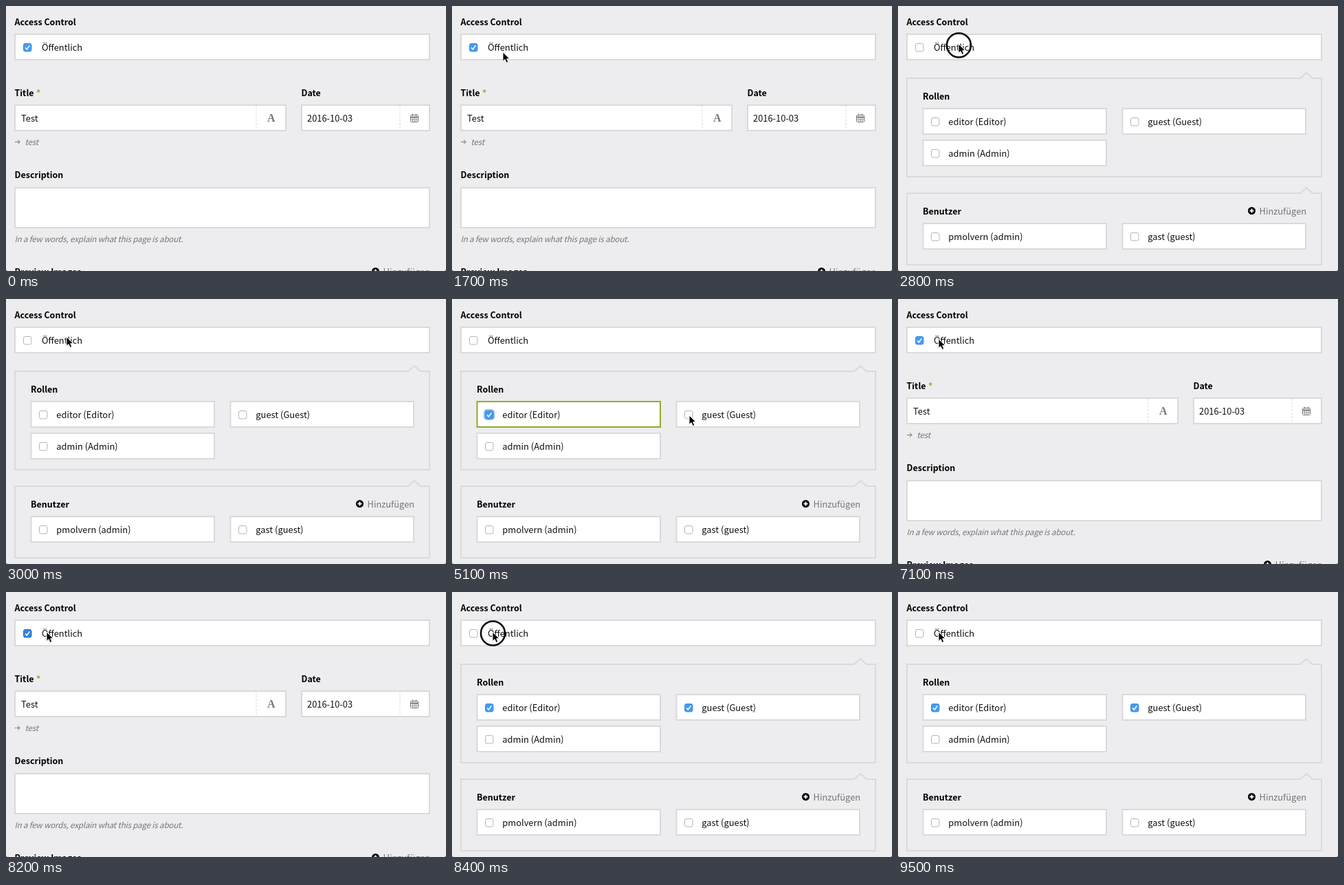
An HTML page that plays this animation: 640x385 px, repeating every 9.6 s.

```html
<!DOCTYPE html>
<html lang="de">
<head>
<meta charset="utf-8">
<title>Access Control</title>
<style>
  html, body { margin: 0; width: 100%; height: 100%; overflow: hidden; background: #edecee; }
  svg { display: block; width: 640px; height: 385px; }
  text { font: 12.9px "Noto Sans CJK JP", "Noto Sans CJK SC", "Noto Sans CJK", sans-serif; fill: #111; white-space: pre; }
  .label { font-size: 12.5px; font-weight: 600; fill: #000; }
  .help { font-size: 11.6px; font-style: italic; letter-spacing: -.17px; fill: #777; }
  .muted { fill: #777; }
  .star { fill: #8dae28; }
  .serif { font: bold 16px "Liberation Serif", serif; fill: #777; }
  .field { fill: #fff; stroke: #dad9dc; stroke-width: 2; }
  .field.focus { stroke: #8dae28; }
  .panel { fill: none; stroke: #dad9dc; stroke-width: 2; }
  .dash { stroke: #dad9dc; stroke-dasharray: 3 2; }
  .icon { fill: none; stroke: #777; }
  .box { fill: #fff; stroke: #b4b4b6; }
  .pressed .box { fill: #dcdcde; stroke: #8f8f92; }
  .checked .box { fill: #459bf4; stroke: #3c8fe8; }
  .checked.pressed .box { fill: #3483e0; stroke: #2a70c8; }
  .tick { fill: none; stroke: #fff; stroke-width: 1.6; visibility: hidden; }
  .checked .tick { visibility: visible; }
  .glow { fill: none; stroke: #8fc0f2; stroke-width: 3; visibility: hidden; }
  .focus .glow { visibility: visible; }
</style>
</head>
<body>
<svg id="stage" viewBox="0 0 640 385"></svg>
<script>
const LOOP = 9600;
const stage = document.getElementById('stage');

const text = (x, y, value, style = '') => `<text x="${x}" y="${y}" class="${style}">${value}</text>`;
const field = (x, y, w, h) => `<rect class="field" x="${x}" y="${y}" width="${w}" height="${h}"/>`;
const panel = (top, bottom) =>
  `<path class="panel" d="M13 ${top}H585L594 ${top - 8}L603 ${top}H616V${bottom}H13Z"/>`;
const dash = x => `<path class="dash" d="M${x} 145V181"/>`;

const option = (id, x, y, w, label, inset = 12) => `
  <g id="${id}">
    ${field(x, y, w, 37)}
    <g transform="translate(${x + inset} ${y + 13})">
      <rect class="glow" x="-.5" y="-.5" width="13" height="13" rx="3.5"/>
      <rect class="box" x=".5" y=".5" width="11.5" height="11.5" rx="2.5"/>
      <path class="tick" d="M3 6.5L5.3 9L9.4 3.4"/>
    </g>
    ${text(x + inset + (inset > 11.9 && w > 300 ? 27 : 25.3), y + 24, label)}
  </g>`;

const addButton = (x, y) => `
  <circle cx="${x}" cy="${y}" r="5.5"/>
  <path d="M${x - 3} ${y}h6M${x} ${y - 3}v6" stroke="#fff" stroke-width="1.8"/>
  ${text(x + 11, y + 5, 'Hinzufügen', 'muted')}`;

const calendar = `
  <g class="icon">
    <rect x="588.5" y="158.5" width="11" height="10" rx="1"/>
    <path d="M588 161.5H600" stroke-width="2"/>
    <path d="M591.5 156.5v3M596.5 156.5v3"/>
    <path d="M591.5 162v6M594 162v6M596.5 162v6M589 165.2h10" stroke-width=".7"/>
  </g>`;

stage.innerHTML = `
  ${text(12.5, 27.5, 'Access Control', 'label')}
  ${option('everyone', 13, 41, 603, 'Öffentlich')}
  <g id="publicView">
    ${text(12.5, 130.5, 'Title', 'label')}${text(44, 130.5, '*', 'label star')}
    ${text(429.5, 130.5, 'Date', 'label')}
    ${field(13, 144, 394, 37)}${dash(364)}${text(22, 168, 'Test')}
    ${text(380, 168, 'A', 'serif')}
    ${field(430, 144, 186, 37)}${dash(573)}${text(438, 168, '2016-10-03')}
    ${calendar}
    <path class="icon" d="M13 197.5H20M17 194.5L20.3 197.5L17 200.5"/>
    ${text(27.5, 202, 'test', 'help')}
    ${text(12.5, 250, 'Description', 'label')}
    ${field(13, 264, 603, 58)}
    ${text(12.5, 342.5, 'In a few words, explain what this page is about.', 'help')}
    ${text(12.5, 390.5, 'Preview Images', 'label')}
    ${addButton(537.5, 385.5)}
  </g>
  <g id="roleView">
    ${panel(105, 248)}
    ${text(36, 135.5, 'Rollen', 'label')}
    ${option('editor', 36.5, 149, 266.5, 'editor (Editor)', 11.5)}
    ${option('guest', 326.5, 149, 266.5, 'guest (Guest)', 11.5)}
    ${option('admin', 36.5, 195, 266.5, 'admin (Admin)', 11.5)}
    ${panel(272, 376)}
    ${text(36, 302.5, 'Benutzer', 'label')}
    ${addButton(514.5, 297.5)}
    ${option('firstUser', 36.5, 316, 266.5, 'pmolvern (admin)', 11.5)}
    ${option('secondUser', 326.5, 316, 266.5, 'gast (guest)', 11.5)}
  </g>
  <path d="M0 382q0 3 3 3H0ZM640 382q0 3-3 3H640Z" fill="#666"/>
  <g id="cursor">
    <circle id="ring" cx=".5" cy="2" r="17.5" fill="none" stroke="#0b0b12" stroke-width="2.6"/>
    <path d="M0 0V13.5L3.1 10.6L5.2 15.5L7.8 14.4L5.7 9.7H10Z" fill="#000" stroke="#fff" stroke-width="1"/>
  </g>`;

// Pointer keyframes: time, x, y
const path = [
  [1200, 215, 392], [1700, 74, 67], [2100, 88, 55], [3900, 88, 55],
  [4400, 55, 167], [4750, 55, 167], [5100, 345, 169], [5900, 345, 169],
  [6500, 59, 58], [LOOP, 59, 58]
];

const HOLD = 200;
const clicks = [
  { id: 'everyone', at: 2600 }, { id: 'editor', at: 4500 }, { id: 'guest', at: 5300 },
  { id: 'everyone', at: 6800 }, { id: 'everyone', at: 8200 }
];

const byId = id => document.getElementById(id);
const show = (id, visible) => { byId(id).style.display = visible ? '' : 'none'; };

function pointerAt(t) {
  const next = path.findIndex(key => key[0] > t);
  const [t0, x0, y0] = path[next - 1], [t1, x1, y1] = path[next];
  const p = (t - t0) / (t1 - t0), eased = p * p * (3 - 2 * p);
  return [x0 + (x1 - x0) * eased, y0 + (y1 - y0) * eased];
}

function draw(t) {
  const checked = { everyone: true, editor: false, guest: false };
  let pressed = null, focused = null;
  for (const { id, at } of clicks) {
    if (t >= at) focused = null;
    if (t >= at && t < at + HOLD) pressed = id;
    if (t >= at + HOLD) {
      checked[id] = !checked[id];
      focused = id === 'everyone' ? null : id;
    }
  }
  for (const id in checked) {
    const style = byId(id).classList;
    style.toggle('checked', checked[id]);
    style.toggle('pressed', pressed === id);
    style.toggle('focus', focused === id);
    byId(id).querySelector('.field').classList.toggle('focus', focused === id);
  }
  show('publicView', checked.everyone);
  show('roleView', !checked.everyone);
  show('ring', clicks.some(({ at }) => t >= at + 100 && t < at + 300));
  show('cursor', t >= path[0][0]);
  if (t >= path[0][0]) byId('cursor').setAttribute('transform', `translate(${pointerAt(t)})`);
}

const start = performance.now();
function tick() {
  draw((performance.now() - start) % LOOP);
  requestAnimationFrame(tick);
}
tick();
</script>
</body>
</html>
```
